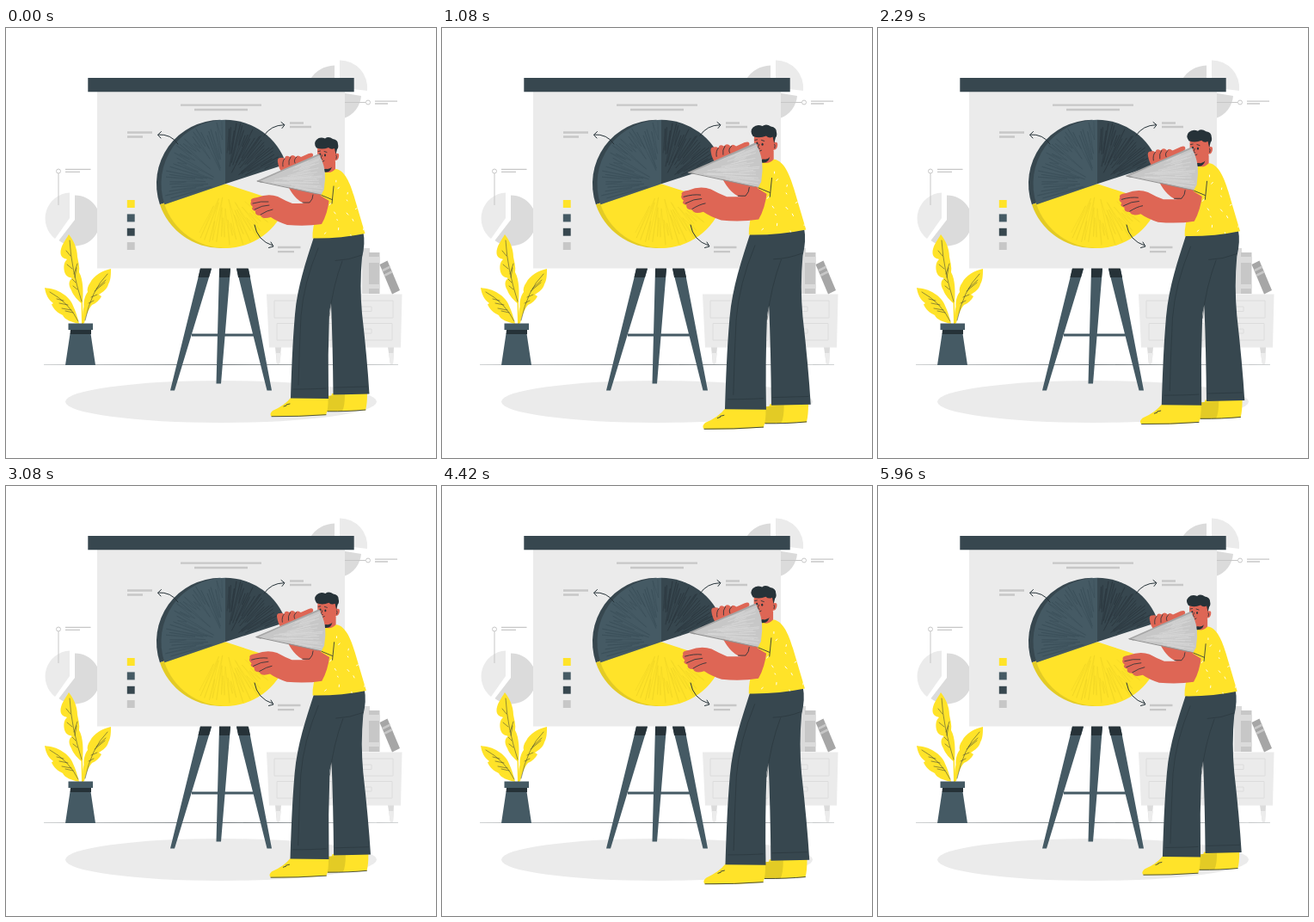
Recreate the animation shown at these times as an HTML page. Size 500x500 px, loop 6 s.

```html
<!DOCTYPE html>
<html lang="en">
<head>
<meta charset="utf-8">
<title>Pie chart presentation</title>
<style>
html, body { margin: 0; width: 100%; height: 100%; overflow: hidden; background: #fff; }
svg { display: block; width: 100vw; height: 100vh; }
.ink { fill: none; stroke: #263238; stroke-width: .8; stroke-linecap: round; stroke-linejoin: round; }
.fine { stroke-width: .5; }
.thin { fill: none; stroke-width: .4; stroke-linejoin: round; }
.y { fill: #ffe329; }
.yd { fill: #e3cb25; }
.slate { fill: #455a64; }
.navy { fill: #37474f; }
.dark { fill: #263238; }
.skin { fill: #de6655; }
.g1 { fill: #ebebeb; }
.g2 { fill: #dbdbdb; }
.g3 { fill: #c7c7c7; }
.g4 { fill: #a6a6a6; }
</style>
</head>
<body>
<svg viewBox="0 0 500 500">
  <defs>
    <path id="shirt" d="M371 165L384 164C394 166 400 180 404.500 195L417.500 239Q388 245 356.500 244.500Q356 231 362 216L367 192Z"/>
    <clipPath id="shirtClip"><use href="#shirt"/></clipPath>
    <clipPath id="sliceClip"><path d="M296 177.500L364 148Q371 160 370.500 177L368.500 193Z"/></clipPath>
  </defs>

  <!-- wall charts -->
  <path class="g1" d="M74 191.500V221L57 245A30 30 0 0 1 74 191.500Z"/>
  <path class="g2" d="M80 194.500V223L61.500 247A29.500 29.500 0 1 0 80 194.500Z"/>
  <path class="g1" d="M388 37.500A32 32 0 0 1 420 73L388 69Z"/>
  <path class="g2" d="M382 43.500V60H353.500Q363 44.500 382 43.500Z"/>
  <path class="g2" d="M383 74L413 79A30 30 0 0 1 393 105Z"/>
  <g fill="none" stroke="#c7c7c7">
    <path d="M61 169V206M394 86.500H418"/>
    <circle cx="61" cy="166.500" r="2.500"/>
    <circle cx="421" cy="86.500" r="2.500"/>
    <path stroke-width="1.300" d="M69 164.300H98.500M69 167.300H86M429 85.200H455M429 88H444"/>
  </g>

  <!-- cabinet and books -->
  <path class="g2" d="M313 371H320L318 391H315ZM444 371H451L450 391H447Z"/>
  <path fill="#ececec" d="M314 378H320L318 391H315ZM445 378H451L450 391H447Z"/>
  <path class="g1" d="M303 309.500H460.500L459 371.500H306Z"/>
  <path fill="none" stroke="#dcdcdc" d="M312 317H379V337H312ZM384 317H450V337H384ZM315 343.500H379V363H315ZM384 343.500H449V363H384ZM411 324H425V329.500H411ZM411 350H425V355H411Z"/>
  <path class="g2" d="M414 256H423V309H414Z"/>
  <path class="g3" d="M422 261H434.500V309H422Z"/>
  <path class="g2" d="M422 266H434.500V273H422ZM422 298H434.500V303H422Z"/>
  <path class="g4" d="M434.500 275L443.500 270.500L458 305L449 309.500Z"/>
  <path class="g3" d="M437 281L446 276.500L447 279L438 283.500ZM439.500 286.500L448.500 282L449.500 284.500L440.500 289Z"/>

  <path fill="#4a5357" d="M44 391.400L250 391.200L456 391.500V391.800L250 392L44 391.700Z"/>
  <ellipse class="g1" cx="250" cy="434.500" rx="181" ry="24.500"/>

  <!-- plant -->
  <path class="y" d="M73 240C69 247 63 254 63.500 262C64 267 68 268 71 269C66 273 67 282 69 286C71 290 75 290 77 291C72 294 73 300 76 305C78 311 84 317 87.500 320L88 344H90L89 320C90 307 90 293 85 284C86 278 84 272 83 266C83 256 78 246 73 240Z"/>
  <path class="y" d="M122 280C112 282 102 288 98 296C95 300 94 304 95 307C92 311 90 317 90.500 324C89 331 88.500 338 89 344L91 343C93 335 95 328 100 322C105 320 109 316 111 312L108 310C113 307 118 303 119 298C122 293 122 286 122 280Z"/>
  <path class="y" d="M45 302C46 309 49 316 55 320L53 321.500C56 328 60 331 66 334C68 339 76 342 85 344C83 336 81 329 78 323C76 317 71 312 66 309C59 304 52 303 45 302Z"/>
  <path class="ink fine" d="M74 247Q76 281 88 318M75 265L70 259M77 280L71 275M79 286L83 274M80 290L82 279M81 296L77 292M83 304L78 300M118 286Q99 305 92 340M103 306L115 296M105 303L116 293M99 313L106 310M96 320L102 317M51 307Q73 319 84 341M67 317L59 315M72 322L62 320M76 328L65 326M78 331L69 329"/>
  <path class="slate" d="M72.500 343.500H101V351H72.500ZM74.500 355.500H98.500L104 392H69Z"/>
  <path class="dark" d="M75 351H99V356H74.500Z"/>

  <!-- easel -->
  <path class="slate" d="M216 355.500H290V358.500H216ZM226 280H239L196 421.500H191ZM248 280H261L250 413.500H244.500ZM268 280H282L309 421.500H303.500Z"/>
  <path class="dark" d="M226 279H239L236 290H223.500ZM248 279H261L260 290H248ZM268 279H281.500L284 290H270Z"/>
  <path class="g1" d="M106 74H394V279.500H106Z"/>
  <path class="navy" d="M95.300 58H404.700V74.300H95.300Z"/>
  <path stroke="#c7c7c7" stroke-width="2.300" d="M203 89.700H297M219 95H281M141 121.500H170M141 126.500H159M330 110.500H346M330 115H355M316 255H342.500M316 260.200H335"/>
  <path class="y" d="M140.800 200H149.700V209H140.800Z"/>
  <path class="slate" d="M140.800 216.400H149.700V225.400H140.800Z"/>
  <path class="navy" d="M140.800 232.800H149.700V241.700H140.800Z"/>
  <path class="g3" d="M140.800 249.100H149.700V258H140.800Z"/>

  <g id="pie"></g>
  <path class="ink" style="stroke-width:1" d="M200 135Q192 123 177 124M180.500 120.500L176.500 124.300L180 128M300 125Q308 113 323 112.700M320 109.500L324 112.700L321 116.500M289 229Q292 247 310 253M308 249L311 254L305.500 255.500"/>

  <g id="man">
    <!-- shoes -->
    <path class="y" d="M379 425L420 424Q420 438 418 444.500Q396 446 372 446L372 433Q378 431 379 425Z"/>
    <path class="yd" d="M372 428L394 426Q394 440 391 445.500L372 446Z"/>
    <path class="y" d="M331 430H374.500Q375 443 372 450Q340 452.500 309 452Q305.500 449 310 445Q324 439 331 430Z"/>
    <path class="ink" d="M309 451.700Q340 452 372 449.700M374 445.800Q398 446 418 444M326 438L330 437M323 440L326 439"/>

    <!-- trousers -->
    <path class="navy" d="M358 243L415.500 238Q418 250 414 267Q411 300 414 332Q420 385 422.500 425.500L380.500 426.500Q380 370 378 320L376 330Q374 380 375 431L331 430.500C332 400 333 368 336 333C339 300 349 271 358 243Z"/>
    <path class="ink fine" d="M414 264Q399 270 383 270.500M391 271Q380 300 376 335M363 256Q346 297 343 335Q341 375 340 415M334 420Q356 420 372 419M382 418L420 417"/>

    <!-- far arm and hand -->
    <path class="skin" d="M328 184L369 188L365 202L350 205Q337 202 328 184ZM316 156Q315 151 319 151Q322 150 324 152Q325 147 330 150Q333 146 337 150Q339 147 343 150L352 146Q358 144 357 149L344 160L321 168Q317 163 316 156Z"/>
    <path class="ink" d="M324 152Q321 155 322 161M331 150Q328 154 329 159M338 150Q334 153 336 157"/>

    <!-- shirt and head -->
    <use href="#shirt" class="y"/>
    <path id="specks" clip-path="url(#shirtClip)" fill="none" stroke="#fff" stroke-width=".9" stroke-linecap="round"/>
    <g transform="translate(0 1)">
      <path class="skin" d="M369 157L383 154L383 163Q377 169 371 166Z"/>
      <path class="dark" d="M370 163Q376 162 379 158Q379 164 375 166Q372 167 370 166.500Z"/>
      <path class="skin" d="M362.500 136L384 137V145Q388 144 387 149Q386 153 383 153Q381 162 374 163Q366 163 364 156Q361 147 362.500 136Z"/>
      <path class="dark" d="M361 138.500Q357 133 361 129Q365 125 371 127.500Q375 124.500 380 128Q386 129 386 134Q387 138 385 140L383.500 146L382 139Q378 141 375 138Q368 141 361 138.500Z"/>
      <ellipse class="dark" cx="365.300" cy="146" rx="1" ry="1.400"/>
      <ellipse class="dark" cx="371" cy="147" rx="1" ry="1.400"/>
      <path class="ink" d="M363 142.500L365.500 142M370 142.500L373 143.500M367.500 147L366 151L368 151.500M366 154Q368 155 370 153.500M384 147Q385 148 384 151"/>
    </g>

    <!-- lifted slice -->
    <path class="g4" d="M291 178L363 146.500L366 148L297 180Z"/>
    <path class="g3" d="M295 178L364.500 148Q371.500 160 371 176L369 194.500Z"/>
    <path id="sliceHatch" class="thin" clip-path="url(#sliceClip)" stroke="#d9d9d9"/>
    <path fill="none" stroke="#929292" d="M292 178L369 194.500"/>

    <!-- near arm -->
    <path class="skin" d="M363 193L376 198Q374 216 367 228Q349 231 327 229Q315 225 308 220Q298 223 296 218Q289 218 290 213Q284 211 287 208Q283 205 285 202Q283 198 292 197Q305 192 316 196Q325 201 333 204L352 204Z"/>
    <path class="y" d="M369 189L381 183L379 203L366 195Z"/>
    <path class="ink" d="M381 184L379 204M367 194.500L379 199.500M345 203L353 203Q357 199 357 194M287 204Q297 201 305 202M289 211Q298 206 306 206M296 217Q304 212 310 211"/>
  </g>
</svg>
<script>
const $ = id => document.getElementById(id);
let seed = 11;
const rnd = () => (seed = seed * 16807 % 2147483647) / 2147483647;
const polar = (cx, cy, r, deg) => {
  const a = deg * Math.PI / 180;
  return `${(cx + r * Math.cos(a)).toFixed(1)} ${(cy + r * Math.sin(a)).toFixed(1)}`;
};
const R = 74.5, CY = 181.3, LEFT = 161.3;

function sector(cx, from, to, fill) {
  return `<path class="${fill}" d="M${cx} ${CY}L${polar(cx, CY, R, from)}A${R} ${R} 0 0 1 ${polar(cx, CY, R, to)}Z"/>`;
}

// zigzag strokes running between the centre and the rim
function scribble(cx, cy, r, from, to, count) {
  let d = "";
  for (let i = 0; i < count; i++) {
    const a = from + (to - from) * (i + .5) / count;
    const inner = r * (.2 + .5 * rnd()), outer = r * (.8 + .18 * rnd());
    d += (i ? "L" : "M") + polar(cx, cy, inner, a) + "L" + polar(cx, cy, outer, a + rnd() * 2 - 1);
  }
  return d;
}
const hatch = (from, to, count, color) =>
  `<path class="thin" stroke="${color}" d="${scribble(255, CY, R, from, to, count)}"/>`;

$("pie").innerHTML =
  sector(249.5, LEFT, 270, "navy") + sector(249.5, 18, LEFT, "yd") +
  sector(255, 18, LEFT, "y") + sector(255, LEFT, 270, "slate") + sector(255, 270, 342, "navy") +
  hatch(164, 268, 30, "#364953") + hatch(272, 340, 26, "#263238") + hatch(40, 120, 20, "#e8d025");

$("sliceHatch").setAttribute("d", scribble(292, 178, 79, -22, 12, 24));

let specks = "";
for (let y = 172; y < 244; y += 12)
  for (let x = 362; x < 416; x += 15)
    specks += `M${x + rnd() * 11} ${y + rnd() * 9}l${rnd() * 4 - 2} ${1 + rnd() * 1.5}`;
$("specks").setAttribute("d", specks);

// two linear pulses: 20% up, 40% down, 20% up, 20% down
const keys = [[0, 1], [1200, 1.1], [3600, 1], [4800, 1.1], [6000, 1]];
function scaleAt(t) {
  const i = keys.findIndex(k => t < k[0]);
  const [t0, s0] = keys[i - 1], [t1, s1] = keys[i];
  return s0 + (s1 - s0) * (t - t0) / (t1 - t0);
}

function draw() {
  const s = scaleAt(performance.now() % 6000);
  $("man").setAttribute("transform", `translate(353.3 289.7) scale(${s}) translate(-353.3 -289.7)`);
  requestAnimationFrame(draw);
}
draw();
</script>
</body>
</html>
```
